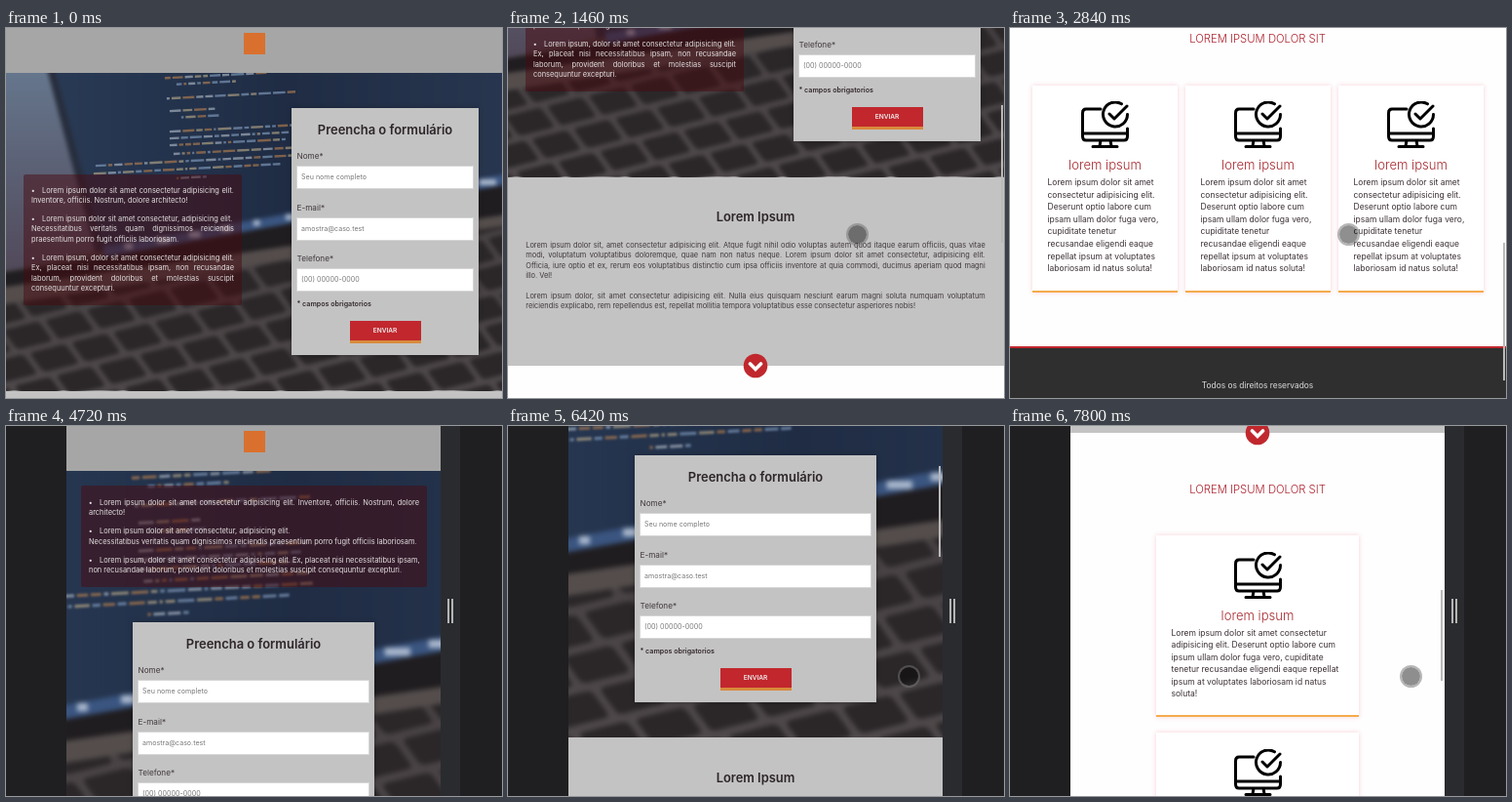
Animation of 509x379 px, one loop 8000 ms. Source, as an HTML page:

```html
<!DOCTYPE html>
<html lang="pt">
<head>
<meta charset="utf-8">
<style>
html, body { margin: 0; width: 100%; height: 100%; overflow: hidden; background: #fff; }
#stage { position: absolute; left: 0; top: 0; width: 509px; height: 379px; overflow: hidden;
  font-family: Inter, "Open Sans", sans-serif; color: #41383d; }
#stage div, #stage svg { position: absolute; box-sizing: border-box; }
.page { left: 0; top: 0; width: 509px; height: 1540px; background: #fefefe; will-change: transform; }
#stage .t { line-height: 20px; height: 20px; margin-top: -10px; white-space: nowrap; }
#stage .c { transform: translateX(-50%); }
#stage .p div { position: static; }
#stage .p { text-align: justify; }
.j { text-align-last: justify; white-space: nowrap; }
.p b { display: inline-block; width: 11px; }
.card { background: #fff; border-bottom: 2px solid #f5ab4c; box-shadow: 0 0 5px rgba(225, 30, 60, .2); }
.field { background: #fff; border: 1px solid #d6d6d6; }
#cursor { width: 23px; height: 23px; margin: -11.5px; border-radius: 50%;
  background: rgba(0, 0, 0, .44); background-clip: padding-box; border: 2px solid rgba(115, 115, 115, .52); }
.bar { background: #b9b9b9; width: 2px; }
</style>
</head>
<body>
<div id="stage"></div>
<script>
const box = (x, y, w, h, css = '', inner = '', cls = '') =>
  `<div class="${cls}" style="left:${x}px;top:${y}px;width:${w}px;height:${h}px;${css}">${inner}</div>`;
// One line of text, vertically centred on y
const text = (x, y, size, str, css = '', cls = '') =>
  `<div class="t ${cls}" style="left:${x}px;top:${y}px;font-size:${size}px;${css}">${str}</div>`;
const centred = (x, y, size, str, css) => text(x, y, size, str, css, 'c');
// Lines are split by "|"; all but the last are justified when asked
const para = (x, y, w, size, pitch, str, css = '', justify = true) => {
  const lines = str.split('|');
  const html = lines.map((l, i) =>
    `<div class="${justify && i < lines.length - 1 ? 'j' : ''}">${l}</div>`).join('');
  return `<div class="p" style="left:${x}px;top:${y - pitch / 2}px;width:${w}px;font-size:${size}px;` +
    `line-height:${pitch}px;${justify ? '' : 'white-space:nowrap;'}${css}">${html}</div>`;
};
const poly = (pts, fill) => `<polygon points="${pts}" fill="${fill}"/>`;
const rand = n => { const v = Math.sin(n * 127.1) * 43758.5453; return v - Math.floor(v); };

// Soft picture of a laptop with lines of code
function photo() {
  const inks = ['#c0b08c', '#8aa5c6', '#b6c0cc', '#bd8450'];
  const rows = [[163, 4, 105], [175, 11, 60], [165, 25, 125], [168, 38, 45], [180, 45, 30], [168, 59, 125],
    [168, 66, 120], [168, 73, 120], [172, 82, 125], [92, 90, 200], [90, 98, 190], [175, 107, 30]];
  let code = '', keys = '', icons = '', seed = 1;
  for (const [x, y, len] of rows) {
    code += `<g transform="rotate(-3 165 ${y})">`;
    for (let d = 0; d < len;) {
      const w = 2 + rand(seed++) * 12;
      code += `<rect x="${x + d}" y="${y}" width="${w}" height="2.4" fill="${inks[Math.floor(rand(seed++) * 4)]}"/>`;
      d += w + 2;
    }
    code += '</g>';
  }
  for (let r = 0; r < 9; r++)
    for (let k = -4; k < 14; k++)
      keys += `<rect x="${k * 44 + r * 9}" y="${r * 29}" width="38" height="23" rx="4"/>`;
  for (let i = 0; i < 12; i++) {
    const x = 122 + i * 33;
    icons += `<rect x="${x}" y="${176 - (x - 112) * .18}" width="${5 + rand(i + 50) * 16}" height="6"/>`;
  }
  return `<svg viewBox="0 0 509 325" width="100%" height="100%" preserveAspectRatio="xMidYMid slice">
    <defs>
      <linearGradient id="wall" x2="0" y2="1"><stop stop-color="#66788f"/><stop offset="1" stop-color="#51495a"/></linearGradient>
      <linearGradient id="screen"><stop stop-color="#293a55"/><stop offset=".5" stop-color="#1f2c44"/><stop offset="1" stop-color="#28364f"/></linearGradient>
      <linearGradient id="base" x2="0" y2="1"><stop offset=".5" stop-color="#474143"/><stop offset="1" stop-color="#4f494b"/></linearGradient>
    </defs>
    <rect width="509" height="325" fill="url(#base)"/>
    <g style="filter:blur(2px)">
      <g fill="#2b2729" transform="translate(-30 240) rotate(-14) skewX(22)">${keys}</g>
      ${poly('-9,-9 44,-9 92,182 -9,205', 'url(#wall)')}
      ${poly('41,-9 50,-9 102,182 92,184', '#272e3d')}
      ${poly('49,-9 520,-9 520,116 102,186', 'url(#screen)')}
      ${poly('100,178 520,102 520,114 102,190', '#3a5580')}
      <g fill="#a9b7cc">${icons}</g>
      ${poly('92,190 520,113 520,146 -9,222 -9,205', '#201d20')}
      ${poly('-9,220 520,144 520,155 -9,238', '#544d4c')}
    </g>
    <g style="filter:blur(.6px)" opacity=".6">${code}</g>
  </svg>`;
}

const icon = `<svg width="49" height="49" viewBox="0 0 49 49" fill="none" stroke="#000" stroke-width="3" stroke-linecap="round" stroke-linejoin="round">
  <path d="M20 8H5Q1.5 8 1.5 12V36Q1.5 40 5 40H44Q47.5 40 47.5 36V28M1.5 33H47.5M20 40L19 46M30 40L31 46M12 46.5H37M41.5 2.8A12.5 12.5 0 1 0 47.5 13.5M29 13l5 5 13-13"/></svg>`;

function form(x, y, w) {
  const fields = [['Nome*', 'Seu nome completo'], ['E-mail*', 'amostra@caso.test'], ['Telefone*', '(00) 00000-0000']];
  return box(x, y, w, 253, 'background:#c3c3c3;box-shadow:0 0 5px rgba(0,0,0,.3)') +
    centred(x + w / 2, y + 21.5, 12.95, 'Preencha o formulário', 'font-weight:600;color:#2d2529') +
    fields.map(([label, hint], i) => text(x + 5.5, y + 49 + i * 52.6, 8.2, label) +
      box(x + 5, y + 59 + i * 52.6, w - 10, 24, '', '', 'field') +
      text(x + 10, y + 71 + i * 52.6, 7.1, hint, 'color:#777')).join('') +
    text(x + 5.5, y + 201, 7.1, '* campos obrigatorios', 'font-weight:600;color:#33272b') +
    box(x + w / 2 - 36, y + 218, 73, 23, 'background:#c1272d;border-bottom:3px solid #d98a3c') +
    centred(x + w / 2, y + 228, 6.6, 'ENVIAR', 'font-weight:600;color:#eee');
}

const card = (x, y, w, h, lines) => box(x, y, w, h, '',
  `<div style="left:${w / 2 - 24.5}px;top:16.5px">${icon}</div>` +
  centred(w / 2, 81.5, 13.1, 'lorem ipsum', 'font-weight:300;color:#a82a30') +
  para(15.5, 100, w - 20, 8.5, 12.55, lines, 'color:#3b3036', false), 'card');

const page = (id, c) => `<div class="page" id="${id}">` +
  box(0, 0, 509, 46, 'background:#a6a6a6') +
  box(244, 5, 22, 22, 'background:#d9702e') +
  box(c.x, 46, c.w, c.grey - 46, 'overflow:hidden', photo()) +
  box(...c.panel, 'background:rgba(72,10,16,.5);border-radius:2px') +
  c.items.map(([y, s, w]) => para(c.panel[0] + 8, y, w || c.panel[2] - 16, 7.45, 10.4, s, 'color:#e4e0e0')).join('') +
  form(...c.form) +
  box(0, c.grey, 509, c.white - c.grey, 'background:#c3c3c3') +
  centred(254, c.grey + 41.5, 12.9, 'Lorem Ipsum', 'font-weight:600;color:#2d2529') +
  c.about.map(([y, s]) => para(c.x + c.pad, y, c.w - 2 * c.pad - 1, 7.4, 10.45, s)).join('') +
  `<svg style="left:241px;top:${c.white - 13}px" width="26" height="26"><circle cx="13" cy="13" r="12.3" fill="#c0282e"/>
    <path d="M7.5 11l5.5 5.5 5.5-5.5" fill="none" stroke="#fff" stroke-width="3.6" stroke-linecap="round"/></svg>` +
  centred(254, c.white + 57.5, 11.3, 'LOREM IPSUM DOLOR SIT', 'font-weight:300;color:#ad1f2c') +
  c.cards.map(([x, y]) => card(x, y, ...c.cardSize, c.cardText)).join('') +
  box(0, c.foot, 509, 82, 'background:#2f2f2f;border-top:2px solid #c1272d') +
  centred(254, c.foot + 40, 8.4, 'Todos os direitos reservados', 'color:#ddd') + '</div>';

const dot = '<b>•</b>';
const wide = {
  x: 0, w: 509, pad: 18.25, grey: 371.5, white: 565, foot: 938,
  panel: [18, 150, 224, 134], form: [293, 82, 192],
  items: [
    [167, dot + 'Lorem ipsum dolor sit amet consectetur adipisicing elit.|Inventore, officiis. Nostrum, dolore architecto!'],
    [196, dot + 'Lorem ipsum dolor sit amet consectetur, adipisicing elit.', 230],
    [206.5, 'Necessitatibus veritatis quam dignissimos reiciendis|praesentium porro fugit officiis laboriosam.'],
    [236, dot + 'Lorem ipsum, dolor sit amet consectetur adipisicing elit.|Ex, placeat nisi necessitatibus ipsam, non recusandae|laborum, provident doloribus et molestias suscipit|consequuntur excepturi.']],
  about: [
    [442, 'Lorem ipsum dolor sit, amet consectetur adipisicing elit. Atque fugit nihil odio voluptas autem quod itaque earum officiis, quas vitae|modi, voluptatum voluptatibus doloremque, quae nam non natus neque. Lorem ipsum dolor sit amet consectetur, adipisicing elit.|Officia, iure optio et ex, rerum eos voluptatibus distinctio cum ipsa officiis inventore at quia commodi, ducimus aperiam quod magni|illo. Vel!'],
    [494, 'Lorem ipsum dolor, sit amet consectetur adipisicing elit. Nulla eius quisquam nesciunt earum magni soluta numquam voluptatum|reiciendis explicabo, rem repellendus est, repellat mollitia tempora voluptatibus esse consectetur asperiores nobis!']],
  cards: [23, 180, 337].map(x => [x, 670.5]), cardSize: [149, 212],
  cardText: 'Lorem ipsum dolor sit amet|consectetur adipisicing elit.|Deserunt optio labore cum|ipsam ullam dolor fuga vero,|cupiditate tenetur|recusandae eligendi eaque|repellat ipsum at voluptates|laboriosam id natus soluta!'
};
const narrow = {
  x: 62, w: 384, pad: 16, grey: 490, white: 705, foot: 1457,
  panel: [77, 61, 355, 104], form: [130, 201, 248],
  items: [
    [79, dot + 'Lorem ipsum dolor sit amet consectetur adipisicing elit. Inventore, officiis. Nostrum, dolore|architecto!'],
    [108.5, dot + 'Lorem ipsum dolor sit amet consectetur, adipisicing elit.'],
    [119, 'Necessitatibus veritatis quam dignissimos reiciendis praesentium porro fugit officiis laboriosam.', 350],
    [138, dot + 'Lorem ipsum, dolor sit amet consectetur adipisicing elit. Ex, placeat nisi necessitatibus ipsam,|non recusandae laborum, provident doloribus et molestias suscipit consequuntur excepturi.']],
  about: wide.about.map(([, s], i) => [562 + i * 62.5, s.replace(/\|/g, ' ')]),
  cards: [0, 1, 2].map(i => [150, 810 + i * 202]), cardSize: [208, 186],
  cardText: 'Lorem ipsum dolor sit amet consectetur|adipisicing elit. Deserunt optio labore cum|ipsum ullam dolor fuga vero, cupiditate|tenetur recusandae eligendi eaque repellat|ipsum at voluptates laboriosam id natus|soluta!'
};

const $ = id => document.getElementById(id);
$('stage').innerHTML = page('wide', wide) +
  box(0, 0, 509, 379, '', page('narrow', narrow) +
    box(0, 0, 62, 379, 'background:#1f1f21') +
    box(446, 0, 20, 379, 'background:#2a2b2f') +
    box(466, 0, 43, 379, 'background:#1f1f21') +
    box(453, 177, 2, 25, 'background:#b5b5b5') +
    box(457, 177, 2, 25, 'background:#b5b5b5')).replace('<div', '<div id="device"') +
  '<div class="bar" id="bar"></div><div id="cursor"></div>';

const FRAME = 70, LOOP = 8000, SWITCH = 4720;
// Wheel notches: start, steps, scroll reached, easing power
const wideScroll = [[840, 5, 133, 2.08], [1320, 5, 266, 1], [1740, 5, 399, 1], [2220, 5, 532, 1], [2700, 5, 639, .66]];
const narrowScroll = [[5870, 4, 140, 1], [6280, 5, 280, 3.48], [6620, 5, 420, 1], [7110, 5, 560, 1], [7520, 5, 698, 1]];
// Pointer: time, x, y
const trail = [[160, 466, 378], [440, 370, 212], [1320, 370, 212], [1600, 347, 211], [3370, 347, 211], [3790, 500, 385],
  [5600, 469, 379], [5810, 411, 256], [LOOP, 411, 256]];

function scrollAt(t, moves) {
  let s = 0;
  for (const [start, n, to, power] of moves) {
    if (t < start) break;
    const k = Math.min(1, (Math.floor((t - start) / FRAME) + 1) / n);
    s += (to - s) * (k * k * (3 - 2 * k)) ** power;
  }
  return Math.round(s);
}

function pointerAt(t) {
  const i = trail.findIndex(k => t < k[0]);
  const [t0, x0, y0] = trail[i - 1], [t1, x1, y1] = trail[i];
  const p = Math.floor((t - t0) / FRAME) * FRAME / (t1 - t0);
  return [x0 + (x1 - x0) * p, y0 + (y1 - y0) * p];
}

function draw() {
  const t = performance.now() % LOOP, small = t >= SWITCH;
  const s = scrollAt(t, small ? narrowScroll : wideScroll);
  $('device').style.display = small ? '' : 'none';
  $(small ? 'narrow' : 'wide').style.transform = `translateY(${-s}px)`;

  const bar = $('bar').style;
  bar.display = (t >= 1320 && t < 3290) || t >= 5870 ? '' : 'none';
  bar.left = (small ? 442 : 506) + 'px';
  bar.top = s * (small ? .24 : .36) + 'px';
  bar.height = (small ? 93 : 141) + 'px';

  const cur = $('cursor').style, shown = (t >= 160 && t < 3790) || t >= 5600;
  cur.display = shown ? '' : 'none';
  if (shown) {
    const [x, y] = pointerAt(t);
    cur.left = x + 'px';
    cur.top = y + 'px';
  }
  requestAnimationFrame(draw);
}
draw();
</script>
</body>
</html>
```
